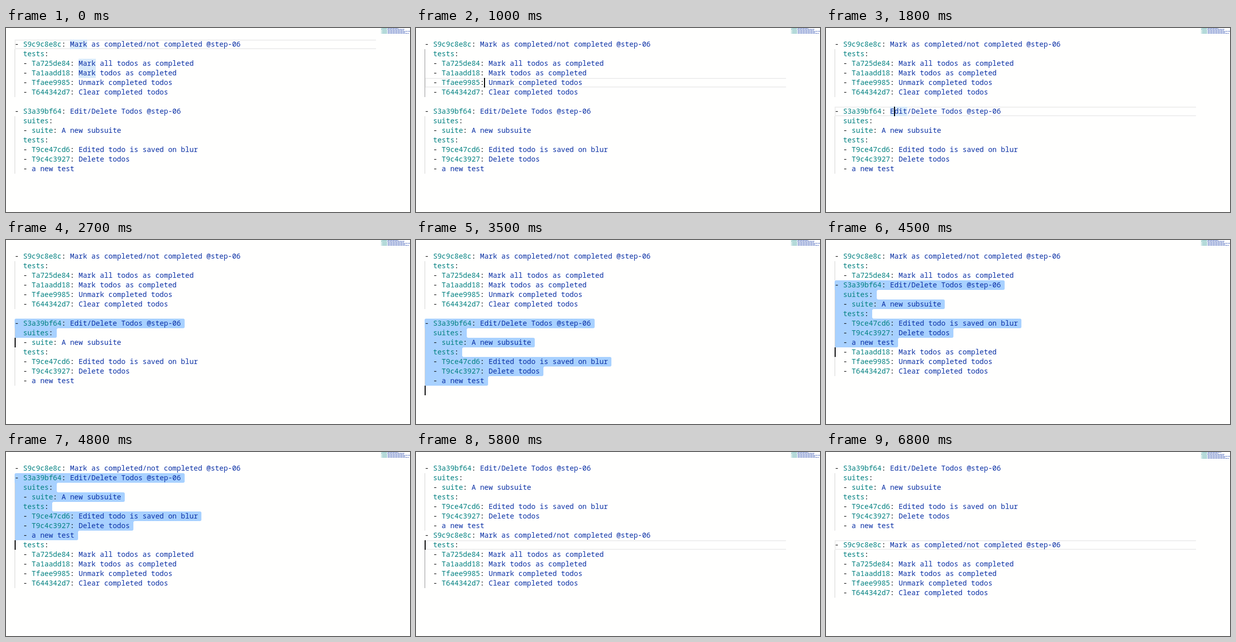
Write an HTML page that moves like this. It is 796x365 px and loops after 7400 ms.

```html
<!DOCTYPE html>
<html lang="en">
<head>
<meta charset="utf-8">
<title>Moving a suite</title>
<style>
  html, body { margin: 0; width: 100%; height: 100%; overflow: hidden; background: #fffffe; }
  #stage { position: relative; width: 796px; height: 365px; overflow: hidden; }
  #stage div { position: absolute; box-sizing: border-box; }
  .text {
    font: 500 14px/19px "Noto Sans Mono", "DejaVu Sans Mono", monospace;
    font-variant-ligatures: none; white-space: pre; color: #000;
  }
  .key { color: #008080; }
  .value { color: #0a30a5; }
  .current { border: 2px solid #eee; border-right: 0; }
  .word { background: #d9ebfb; }
  .selected { background: #a8d1ff; }
  .notch { background: radial-gradient(circle at 100% 100%, transparent 2.6px, #a8d1ff 3.2px); }
  .notch.low { background: radial-gradient(circle at 100% 0, transparent 2.6px, #a8d1ff 3.2px); }
  .guide { background: #d3d3d3; }
  .guide.active { background: #939393; }
  .cursor { background: #000; }
  .mini { opacity: .65; }
  .mini.key { background: repeating-linear-gradient(90deg, #008080 0 2px, #4da6a6 2px 3px); }
  .mini.value { background: repeating-linear-gradient(90deg, #0a30a5 0 4px, #8fa0d4 4px 5px); }
</style>
</head>
<body>
<div id="stage"></div>
<script>
const LEFT = 17, TOP = 23, LINE = 19, CHAR = 8.4, RIGHT = 729, LOOP = 7400;

const marking = [
  '- S9c9c8e8c: Mark as completed/not completed @step-06',
  '  tests:',
  '  - Ta725de84: Mark all todos as completed',
  '  - Ta1aadd18: Mark todos as completed',
  '  - Tfaee9985: Unmark completed todos',
  '  - T644342d7: Clear completed todos',
  ''
];
const editing = [
  '- S3a39bf64: Edit/Delete Todos @step-06',
  '  suites:',
  '  - suite: A new subsuite',
  '  tests:',
  '  - T9ce47cd6: Edited todo is saved on blur',
  '  - T9c4c3927: Delete todos',
  '  - a new test'
];

// Each step changes part of the editor state; "at" is the first line of the moved suite.
const start = { row: 0, col: 14, on: false, at: 7, select: false, word: 'Mark', gap: false };
const steps = [
  [0, {}],
  [500, { on: true }],
  [600, { row: 1, word: '' }],
  [700, { row: 2 }],
  [800, { row: 3 }],
  [1000, { row: 4 }],
  [1100, { row: 5 }],
  [1200, { row: 6 }],
  [1500, { row: 7 }],
  [1800, { word: 'Edit' }],
  [2000, { on: false }],
  [2100, { on: true, col: 0, word: '' }],
  [2700, { row: 9, select: true }],
  [3000, { row: 10 }],
  [3100, { row: 11 }],
  [3200, { row: 12 }],
  [3300, { row: 13 }],
  [3500, { row: 14 }],
  [4000, { on: false }],
  [4100, { on: true, row: 13, at: 6 }],
  [4300, { row: 12, at: 5 }],
  [4400, { row: 11, at: 4 }],
  [4500, { row: 10, at: 3 }],
  [4700, { row: 9, at: 2 }],
  [4800, { row: 8, at: 1 }],
  [5000, { row: 7, at: 0 }],
  [5500, { on: false }],
  [5800, { on: true, row: 8, select: false }],
  [6000, { row: 7 }],
  [6300, { row: 8, gap: true }],
  [6800, { on: false }]
];

let last = start;
const states = steps.map(([time, change]) => (last = { ...last, ...change, time }));

// Minimap lines: indent, key length, value length
const minimap = [[2, 10, 21], [0, 11, 34], [2, 10, 32], [2, 10, 45], [2, 10, 35], [2, 10, 42]];

const stage = document.getElementById('stage');
const xAt = col => LEFT + col * CHAR;
const yAt = row => TOP + row * LINE;

function box(name, x, y, w, h, radius = '') {
  const el = document.createElement('div');
  el.className = name;
  Object.assign(el.style, {
    left: x + 'px', top: y + 'px', width: w + 'px', height: h + 'px', borderRadius: radius
  });
  stage.append(el);
}

function drawText(line, row) {
  const el = document.createElement('div');
  el.className = 'text';
  el.style.left = LEFT + 'px';
  el.style.top = yAt(row) - 1 + 'px';
  const [, lead, key = '', colon = '', value] = line.match(/^( *(?:- )?)(?:(\w+)(:))?(.*)$/);
  for (const [name, text] of [['', lead], ['key', key], ['', colon], ['value', value]]) {
    if (!text) continue;
    const span = document.createElement('span');
    span.className = name;
    span.textContent = text;
    el.append(span);
  }
  stage.append(el);
}

function drawSelection(lines, from, to) {
  const edge = row => row < from || row >= to ? LEFT : Math.round(xAt(lines[row].length)) + 7;
  for (let row = from; row < to; row++) {
    const right = edge(row), above = edge(row - 1), below = edge(row + 1), y = yAt(row);
    const corners = [row === from, right > above, right > below, false];
    box('selected', LEFT, y, right - LEFT, LINE, corners.map(c => c ? '3px' : '0').join(' '));
    if (above > right) box('notch', right, y, 3, 3);
    if (below > right) box('notch low', right, y + LINE - 3, 3, 3);
  }
}

function drawGuides(lines, activeRow) {
  for (let row = 0; row < lines.length; row++) {
    const first = row;
    while (row < lines.length && lines[row].startsWith('  ')) row++;
    if (row === first) continue;
    const active = activeRow >= first && activeRow < row;
    box(active ? 'guide active' : 'guide', LEFT, yAt(first), 1, (row - first) * LINE);
  }
}

function drawMinimap(gap) {
  const rows = gap ? [[2, 10, 27], ...minimap] : minimap;
  rows.forEach(([indent, key, value], i) => {
    const x = 739 + indent;
    if (indent) box('mini key', 739, i * 2, 1, 1);
    box('mini key', x, i * 2, key, 1);
    box('mini value', x + key + 1, i * 2, Math.min(value, 796 - x - key), 1);
  });
}

function draw(s) {
  stage.replaceChildren();
  const lines = [...marking];
  lines.splice(s.at, 0, ...editing);
  if (s.gap) lines.splice(editing.length, 0, '');

  if (s.select) drawSelection(lines, s.at, s.row);
  else box('current', LEFT, yAt(s.row), RIGHT - LEFT, LINE);
  drawGuides(lines, s.select ? -1 : s.row);

  lines.forEach((line, row) => {
    if (s.word) {
      const col = line.search(new RegExp(`\\b${s.word}\\b`));
      if (col >= 0) box('word', xAt(col), yAt(row), s.word.length * CHAR, LINE);
    }
    drawText(line, row);
  });

  if (s.on) {
    const col = Math.min(s.col, (lines[s.row] || '').length);
    box('cursor', Math.floor(xAt(col)), yAt(s.row), 2, LINE);
  }
  drawMinimap(s.gap);
}

let shown;
const origin = performance.now();
function tick() {
  const time = (performance.now() - origin) % LOOP;
  const state = states.filter(s => s.time <= time).pop();
  if (state !== shown) draw(shown = state);
  requestAnimationFrame(tick);
}
tick();
</script>
</body>
</html>
```
